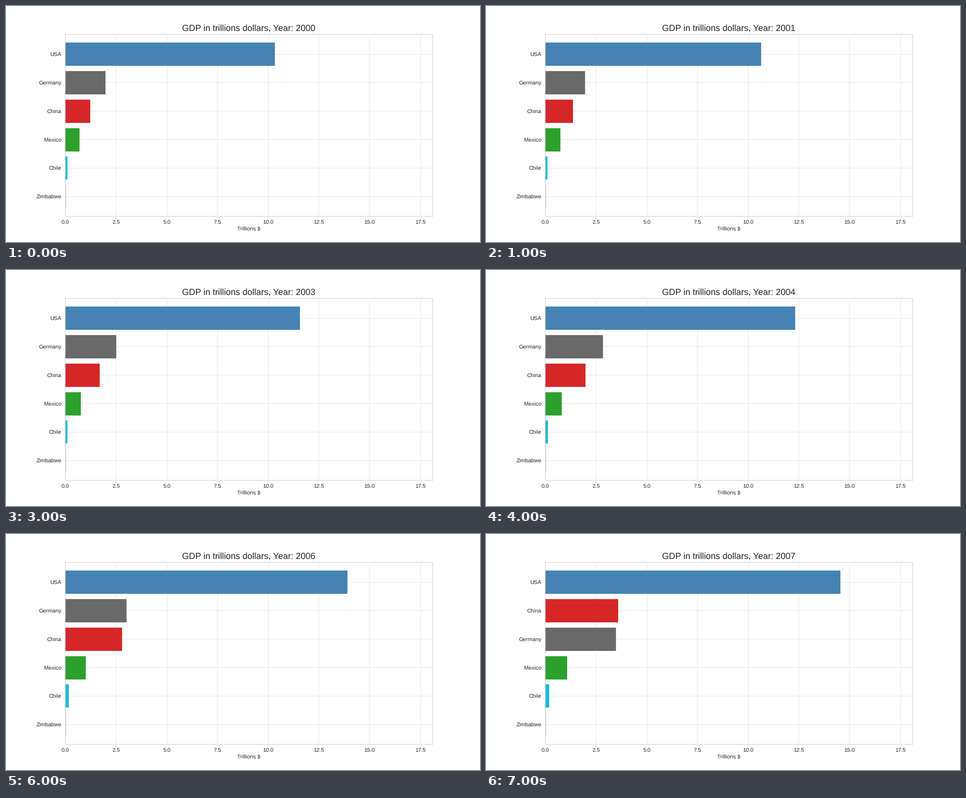
Animation of 1058 by 529 pixels, one loop 8 s. Source, as a matplotlib script:

```python
import matplotlib.pyplot as plt
import numpy as np
from matplotlib.animation import FuncAnimation

FIRST_YEAR = 2000
YEARS = 8
FRAME_MS = 1000

# Bar colour, first and last GDP in trillions, waves around the straight trend
COUNTRIES = {
    "USA": ("steelblue", 10.31, 14.52, (-0.46, -0.167, 0.049)),
    "Germany": ("dimgray", 1.95, 3.46, (-0.176, -0.046, -0.165, 0.045)),
    "China": ("tab:red", 1.21, 3.58, (-0.633, 0.119, -0.055, 0.038)),
    "Mexico": ("tab:green", 0.69, 1.06, (-0.099, 0.01, 0.026)),
    "Chile": ("tab:cyan", 0.078, 0.18, (-0.036, -0.005, 0.006)),
    "Zimbabwe": ("lightgray", 0.006, 0.006, ()),
}

plt.rcParams.update({
    "font.family": "Liberation Sans",
    "font.size": 10,
    "text.color": ".15",
    "text.hinting": "none",
    "axes.labelcolor": ".15",
    "axes.labelpad": 3,
    "axes.edgecolor": ".78",
    "axes.linewidth": 0.8,
    "axes.axisbelow": True,
    "axes.grid": True,
    "grid.color": ".89",
    "grid.linewidth": 0.8,
    "xtick.color": ".15",
    "ytick.color": ".15",
    "xtick.major.size": 0,
    "ytick.major.size": 0,
    "xtick.major.pad": 7,
    "ytick.major.pad": 7,
})


def gdp(name, step):
    """Straight trend plus sine waves that vanish in the first and last year."""
    _, first, last, waves = COUNTRIES[name]
    progress = step / (YEARS - 1)
    swing = sum(size * np.sin(np.pi * order * progress)
                for order, size in enumerate(waves, start=1))
    return first + (last - first) * progress + swing


fig, ax = plt.subplots(figsize=(12, 6), dpi=1058 / 12)
fig.subplots_adjust(left=0.125, right=0.9, bottom=0.11, top=0.88)

rows = range(len(COUNTRIES))
bars = ax.barh(rows, [0] * len(COUNTRIES), height=0.8, linewidth=1)
ax.set_xlim(0, 18.11)
ax.set_ylim(-0.69, len(COUNTRIES) - 0.31)
ax.set_xticks(np.arange(0, 18, 2.5))
ax.set_xlabel("Trillions $")
title = ax.set_title("", fontsize=16)


def update(step):
    ranking = sorted(COUNTRIES, key=lambda name: gdp(name, step))
    for bar, name in zip(bars, ranking):
        bar.set_width(gdp(name, step))
        bar.set_color(COUNTRIES[name][0])
    ax.set_yticks(rows, ranking)
    title.set_text(f"GDP in trillions dollars, Year: {FIRST_YEAR + step}")
    return [*bars, title]


anim = FuncAnimation(fig, update, frames=YEARS, interval=FRAME_MS,
                     repeat=True, repeat_delay=0, blit=False)
plt.show()
```
